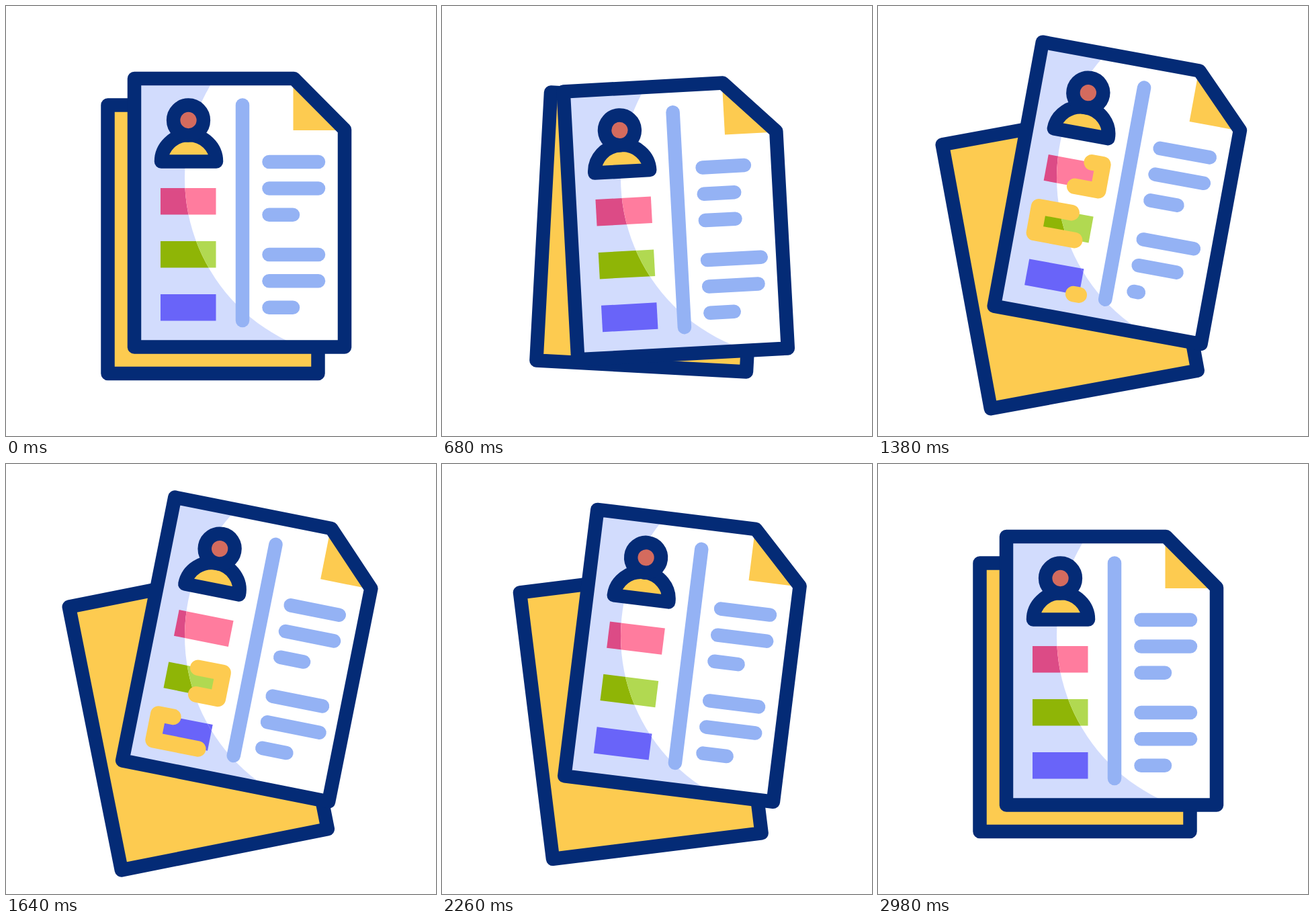
An HTML page for the animation above (3100 ms loop, 640 px wide and 640 px high).

```html
<!DOCTYPE html>
<html lang="en">
<head>
<meta charset="utf-8">
<title>Résumé pages</title>
<style>
  html, body { margin: 0; width: 100%; height: 100%; overflow: hidden; background: #fff; }
  svg { display: block; width: 100%; height: 100%; }
  .ink { stroke: #042b76; stroke-width: 20.5; stroke-linejoin: round; }
  .rule { stroke: #94b2f4; stroke-width: 20.5; stroke-linecap: round; }
  .trace { fill: none; stroke: #fdcb50; stroke-width: 23.5; stroke-linecap: round; stroke-linejoin: round; }
</style>
</head>
<body>
<svg viewBox="0 0 640 640">
  <defs>
    <clipPath id="lens"><circle cx="534.6" cy="256" r="268.6"/></clipPath>
    <path id="sheet" d="M191 108H428.5L504 184V507.5H191Z"/>
  </defs>
  <g id="back"><use href="#sheet" class="ink" fill="#fdcb50" x="-39.5" y="39.5"/></g>
  <g class="front">
    <use href="#sheet" fill="#d2dcfd"/>
    <g class="tags" data-colors="#dc4b86 #8fb506 #6964f9"></g>
  </g>
  <g clip-path="url(#lens)">
    <g class="front">
      <use href="#sheet" fill="#fff"/>
      <g class="tags" data-colors="#ff7c9e #b1d951 #6964f9"></g>
    </g>
  </g>
  <g class="front">
    <path fill="#fdcb50" d="M427.5 108V185H504V184L428.5 108Z"/>
    <use href="#sheet" class="ink" fill="none"/>
    <path class="ink" fill="#fdcb50" d="M231 231.5A41 39.5 0 0 1 313 231.5Z"/>
    <circle class="ink" fill="#d46b5e" cx="271.5" cy="170" r="22.4"/>
    <path class="rule" d="M352 147.5V468"/>
    <g id="rules"></g>
    <g id="traces"></g>
  </g>
</svg>
<script>
const LOOP = 3100;
const make = (parent, tag, attrs) => {
  const el = document.createElementNS('http://www.w3.org/2000/svg', tag);
  for (const name in attrs) el.setAttribute(name, attrs[name]);
  return parent.appendChild(el);
};
const times = (n, fn) => Array.from({ length: n }, (_, i) => fn(i));

// Smooth monotone curve through [time, value] points.
function curve(...points) {
  const n = points.length - 1;
  const slope = i => (points[i + 1][1] - points[i][1]) / (points[i + 1][0] - points[i][0]);
  const tangent = points.map((_, i) => {
    if (i === 0 || i === n) return 0;
    const a = slope(i - 1), b = slope(i);
    return a * b > 0 ? 2 * a * b / (a + b) : 0;
  });
  return t => {
    if (t <= points[0][0]) return points[0][1];
    if (t >= points[n][0]) return points[n][1];
    const i = points.findIndex(p => p[0] > t) - 1;
    const [t0, v0] = points[i], [t1, v1] = points[i + 1];
    const h = t1 - t0, u = (t - t0) / h, w = 1 - u;
    return v0 * w * w * (1 + 2 * u) + v1 * u * u * (3 - 2 * u)
      + h * u * w * (tangent[i] * w - tangent[i + 1] * u);
  };
}

// The pages wind up, fan out, keep drifting apart and swing shut.
const angle = curve([110, 0], [650, -3.35], [980, 7.95], [1380, 10.4],
  [1920, 12.15], [2080, 12.9], [2510, -2.4], [2980, 0]);
const spread = curve([650, 0], [980, 16], [2080, 20.8], [2510, 1], [2980, 0]);
const sag = curve([650, 0], [980, 6.8], [1920, 7.2], [2380, 0]);
const drift = curve([650, 0], [980, -5], [2260, 1.2], [2980, 0]);

const stretch = curve([-560, 0], [-320, 10.5], [0, -28], [340, 6], [680, 0]);
const traceHead = curve([-60, 0], [200, 102], [300, 171], [540, 276], [850, 287]);
const traceTail = curve([100, 0], [300, 21], [600, 187], [850, 287]);

const tagTop = i => 271 + 79 * i;
document.querySelectorAll('.tags').forEach(group =>
  group.dataset.colors.split(' ').forEach((fill, i) =>
    make(group, 'rect', { x: 230, y: tagTop(i), width: 82.5, height: 39.5, fill })));

const traces = times(3, i => {
  const top = tagTop(i), bottom = top + 39.5;
  return {
    start: 780 + 300 * i,
    el: make(document.getElementById('traces'), 'path', {
      class: 'trace',
      d: `M312.5 ${bottom}H230V${top}H312.5V${bottom}H230`
    })
  };
});

// Two paragraphs of three lines, each ending in a short line.
const rules = times(6, i => {
  const y = 232 + 39.4 * i + (i > 2 ? 19.7 : 0);
  const order = i < 2 ? 1 - i : i;
  return {
    length: i % 3 === 2 ? 35.5 : 73.5,
    shortest: 690 + 138 * order,
    el: make(document.getElementById('rules'), 'line', { class: 'rule', x1: 391.5, y1: y, y2: y })
  };
});

const back = document.getElementById('back');
const fronts = document.querySelectorAll('.front');

// side is 1 for the front page and -1 for the back page, which mirrors it
function pose(t, side, cx, cy) {
  const a = angle(t), d = drift(t);
  const x = d + side * spread(t);
  const y = 0.3 * d + side * (sag(t) - 3.4 * a);
  return `translate(${x} ${y}) rotate(${side * a} ${cx} ${cy})`;
}

function draw(t) {
  back.setAttribute('transform', pose(t, -1, 308, 347.25));
  const front = pose(t, 1, 347.5, 307.75);
  fronts.forEach(el => el.setAttribute('transform', front));

  rules.forEach(r => r.el.setAttribute('x2', 391.5 + r.length + stretch(t - r.shortest)));

  traces.forEach(({ start, el }) => {
    const local = t - start, tail = traceTail(local);
    const length = Math.max(0.1, traceHead(local) - tail);
    el.setAttribute('visibility', local > -30 && local < 850 ? 'visible' : 'hidden');
    el.setAttribute('stroke-dasharray', `${length} 1000`);
    el.setAttribute('stroke-dashoffset', -tail);
  });
}

const origin = performance.now();
function tick() {
  draw((performance.now() - origin) % LOOP);
  requestAnimationFrame(tick);
}
tick();
</script>
</body>
</html>
```
